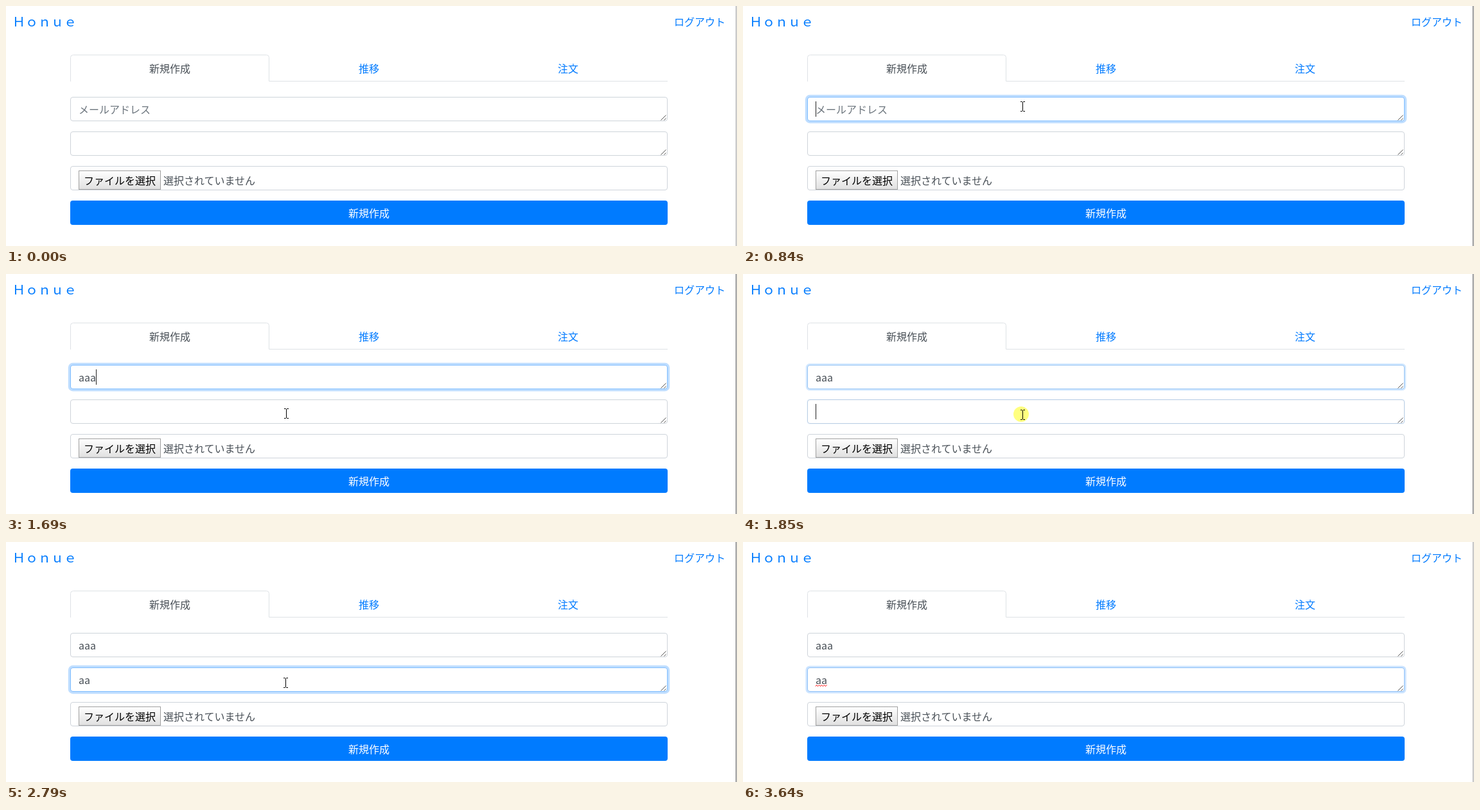
Animation, 1138 px wide and 375 px high, one loop 3.74 s. Source, as an HTML page:

```html
<!DOCTYPE html>
<html lang="ja">
<head>
<meta charset="utf-8">
<style>
  html, body { margin: 0; width: 100%; height: 100%; overflow: hidden; background: #fff; }
  svg { display: block; width: 1138px; height: 375px; font: 16px "Noto Sans CJK JP", "Noto Sans CJK", sans-serif; fill: #495057; }
  .link { fill: #007bff; }
  .mid { text-anchor: middle; }
  .box { fill: #fff; stroke: #ced4da; }
  .line { fill: none; stroke: #dee2e6; }
  .halo { fill: none; stroke: #007bff; }
  .grip { fill: none; stroke: #555; }
  .caret { fill: #222; }
  .hint { fill: #6c757d; }
  .cursor path { fill: #fff; stroke: #000; }
  .cursor #beam { fill: none; }
</style>
</head>
<body>
<svg viewBox="0 0 1138 375">
  <defs>
    <linearGradient id="face" x2="0" y2="1">
      <stop stop-color="#fff"/><stop offset="1" stop-color="#e0e0e0"/>
    </linearGradient>
  </defs>

  <text class="link" x="10" y="32" font-size="20">Ｈｏｎｕｅ</text>
  <text class="link" x="1040" y="31">ログアウト</text>
  <rect x="1137" width="1" height="375" fill="#e4e4e4"/>
  <rect id="edge" x="1136" width="1" height="375"/>

  <path class="line" d="M100.5 118V80.5a4 4 0 0 1 4-4h301a4 4 0 0 1 4 4v37H1030"/>
  <text class="mid" x="255" y="104">新規作成</text>
  <text class="mid link" x="565" y="104">推移</text>
  <text class="mid link" x="875" y="104">注文</text>

  <g id="fields"></g>

  <rect class="box" x="100.5" y="250.5" width="929" height="37" rx="3.5"/>
  <rect x="113.5" y="257.5" width="127" height="29" fill="url(#face)" stroke="#a0a0a0"/>
  <text x="121" y="279" fill="#000">ファイルを選択</text>
  <text x="245" y="279">選択されていません</text>

  <rect class="link" x="100" y="304" width="930" height="38" rx="4"/>
  <text class="mid" x="565" y="330" fill="#fff" font-weight="500">新規作成</text>

  <path id="squiggle" d="M113 225.5l1.5-2 2 2 2-2 2 2 2-2 2 2 2-2 2 2 2-2" fill="none" stroke="#f00"/>
  <circle id="click" cx="433" r="12" fill="#ff0" fill-opacity=".5"/>
  <g class="cursor">
    <path id="beam" d="M-3 -7.5h2.5l1 1 1-1H4M.5 -7V7M-3 7.5h2.5l1-1 1 1H4"/>
    <path id="arrow" d="M.5 .5v16l4-3.5 2.5 6 2.5-1-2.5-6h5z"/>
    <path id="hand" d="M5.5 12V2q1.500-2 3 0v6l6 1.500q2 .5 2 3v4l-2 5h-8l-5-8q0-2 2-1.500z"/>
  </g>
</svg>

<script>
const LOOP = 3740;
const $ = id => document.getElementById(id);
const cursors = ["beam", "arrow", "hand"];

// Tracks hold [start time, values...]; each entry lasts until the next.
const pointer = [
  [0, ""], [70, "hand", 906, 326], [140, "beam", 455, 146], [210, "beam", 435, 157],
  [1000, "beam", 441, 152], [1080, "beam", 439, 154], [1150, "beam", 436, 156],
  [1620, "beam", 442, 178], [1690, "beam", 436, 218], [1850, "beam", 435, 220],
  [2870, "arrow", 628, 288], [2930, ""]
];
const clicks = [[0, 0], [700, 156], [840, 0], [1850, 219], [1940, 0]];
const inputs = [
  {
    top: 142, hint: "メールアドレス",
    typed: [[0, 0], [1230, 1], [1460, 2], [1540, 3]],
    focus: [[0, 0], [700, .12], [760, .5], [840, 1], [1850, .7], [1940, 0]],
    caret: [[0, 0], [700, 1], [1850, 0]]
  },
  {
    top: 196, hint: "",
    typed: [[0, 0], [2080, 1], [2240, 2]],
    focus: [[0, 0], [1850, .25], [1940, 1], [3640, .8]],
    caret: [[0, 0], [1850, 1], [2790, 0], [3250, 1], [3640, 0]]
  }
];

const at = (track, t) => track.findLast(step => step[0] <= t).slice(1);
const show = (el, on) => el.setAttribute("visibility", on ? "visible" : "hidden");

$("fields").innerHTML = inputs.map(({ top }) => `
  <g transform="translate(0 ${top})">
    <rect class="halo" x="100" width="930" height="38" rx="4"/>
    <rect class="box" x="100.5" y=".5" width="929" height="37" rx="3.5"/>
    <path class="grip" d="M1019.500 36.500l8-8M1024.500 36.500l3-3"/>
    <text x="113" y="26"></text>
    <rect class="caret" y="7" width="1" height="24"/>
  </g>`).join("");

inputs.forEach((input, i) => {
  const group = $("fields").children[i];
  [input.halo, input.box, , input.text, input.bar] = group.children;
});

function drawInput({ halo, box, text, bar, ...input }, t) {
  const [count] = at(input.typed, t);
  const [focus] = at(input.focus, t);
  halo.style.strokeWidth = 6.4 * focus;
  halo.style.strokeOpacity = .25 * focus;
  box.style.stroke = `color-mix(in srgb, #80bdff ${focus * 100}%, #ced4da)`;
  text.textContent = "a".repeat(count) || input.hint;
  text.setAttribute("class", count ? "" : "hint");
  bar.setAttribute("x", 113 + 9 * count);
  show(bar, at(input.caret, t)[0]);
}

function draw(now) {
  const t = now % LOOP;
  inputs.forEach(input => drawInput(input, t));

  const [kind, x, y] = at(pointer, t);
  for (const id of cursors) {
    show($(id), id === kind);
    if (id === kind) $(id).setAttribute("transform", `translate(${x} ${y})`);
  }

  const [clickY] = at(clicks, t);
  show($("click"), clickY);
  $("click").setAttribute("cy", clickY);

  show($("squiggle"), t >= 3330);
  $("edge").setAttribute("fill", t >= 700 && t < 3640 ? "#606060" : "#a8a8a8");
  requestAnimationFrame(draw);
}
requestAnimationFrame(draw);
</script>
</body>
</html>
```
